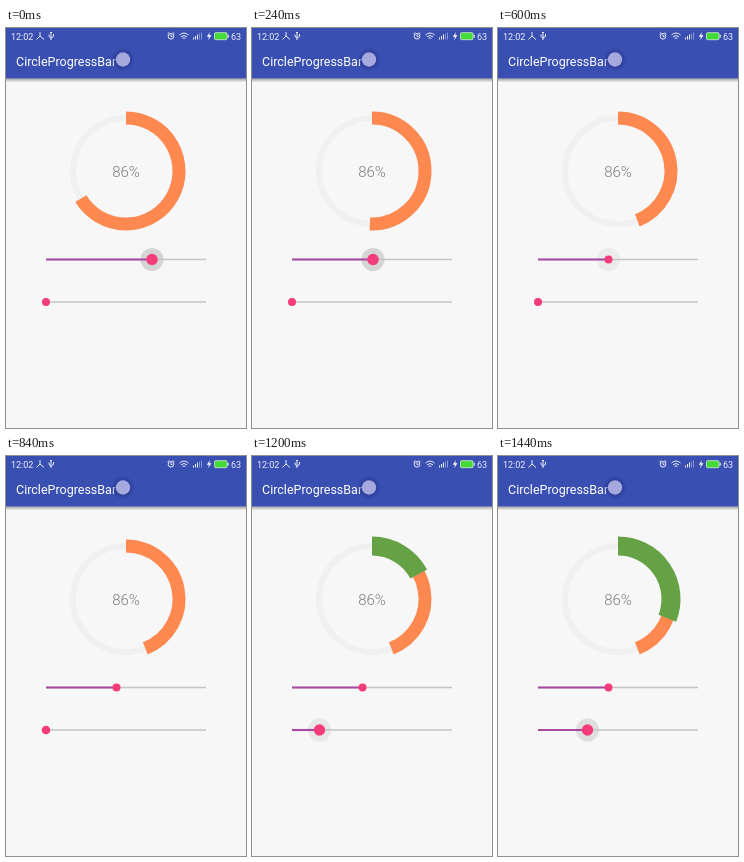
These frames come from a looping animation (240 px wide and 400 px high, 1560 ms). An HTML page:

```html
<!DOCTYPE html>
<html lang="en">
<head>
<meta charset="utf-8">
<title>CircleProgressBar</title>
<style>
html, body { margin: 0; width: 100%; height: 100%; overflow: hidden; background: #f7f7f7; }
svg { display: block; width: 240px; height: 400px; font-family: Roboto, sans-serif; }
.icon { fill: none; stroke: #e9ecfa; stroke-width: 1; }
.ring { fill: none; }
</style>
</head>
<body>
<svg viewBox="0 0 240 400">
  <defs>
    <linearGradient id="shade" x2="0" y2="1">
      <stop stop-color="#000" stop-opacity=".34"/>
      <stop offset="1" stop-color="#000" stop-opacity="0"/>
    </linearGradient>
    <radialGradient id="halo">
      <stop offset=".6" stop-color="#26348c" stop-opacity=".6"/>
      <stop offset="1" stop-color="#26348c" stop-opacity="0"/>
    </radialGradient>
  </defs>
  <rect width="240" height="400" fill="#f7f7f7"/>
  <rect width="240" height="50.5" fill="#3a4fb2"/>
  <rect y="50.5" width="240" height="4" fill="url(#shade)"/>

  <g fill="#eef0fb" font-size="9">
    <text x="5" y="11.5">12:02</text>
    <text x="225" y="11.5">63</text>
  </g>
  <g class="icon">
    <path d="M34 4V8L30.5 11.5M34 8L38 11.5"/>
    <path d="M45 4V12M43 6.5V8.5L45 10L47.5 8.5V6M44 5L45 4L46 5"/>
    <circle cx="165" cy="8.3" r="2.8"/>
    <path d="M165 6.5V8.5H166.5M161.5 6L163.3 4.3M166.7 4.3L168.5 6"/>
    <path d="M173.5 7Q178 3 182.5 7M175 8.8Q178 6.2 181 8.8M176.6 10.4Q178 9.3 179.4 10.4"/>
    <path d="M187.5 11.5V9.5M189.5 11.5V8M191.5 11.5V6.5"/>
    <path d="M193.5 11.5V5.5M195.5 11.5V4.5" opacity=".45"/>
  </g>
  <path d="M204 4L200.8 8.7H203L202 12.3L205.5 7.3H203.2Z" fill="#fff"/>
  <rect x="208.5" y="4.7" width="12.5" height="7" rx="1" fill="#42db35" stroke="#d5ecda" stroke-width=".8"/>
  <rect x="221.5" y="6.7" width="1.3" height="3" fill="#d5ecda"/>

  <text x="10" y="38" font-size="12.5" fill="#fff">CircleProgressBar</text>
  <circle cx="117" cy="31.5" r="12" fill="url(#halo)"/>
  <circle cx="117" cy="31.5" r="7.2" fill="#a6a9de"/>

  <circle class="ring" cx="120" cy="143" r="53" stroke="#f0f0f0" stroke-width="6"/>
  <path class="ring" id="orange" stroke="#fd8850" stroke-width="13"/>
  <path class="ring" id="green" stroke="#65a145" stroke-width="19"/>
  <text x="120" y="149.3" font-size="15" font-weight="300" text-anchor="middle" fill="#7c7c7c">86%</text>

  <g class="slider" transform="translate(40 231.5)"></g>
  <g class="slider" transform="translate(40 274)"></g>
</svg>
<script>
const STEP = 120, LOOP = 1560, WIDTH = 160;
// Per step: thumb offset, thumb radius, ripple strength
const tracks = [
  { x: [106, 91, 81, 74, 71, 70.5], r: [5.7, 5.7, 5.7, 5.7, 5.5, 4], ripple: [1, 1, 1, 1, .9, .35, 0] },
  { x: [0, 0, 0, 0, 0, 0, 0, 0, 4, 15, 27.5, 38, 49.5],
    r: [4, 4, 4, 4, 4, 4, 4, 4.3, 5, 5.6, 5.7],
    ripple: [0, 0, 0, 0, 0, 0, 0, 0, .15, .3, .45, .6, .75] }
];
const arcs = ['orange', 'green'].map(id => document.getElementById(id));
const sliders = [...document.querySelectorAll('.slider')];
const at = (list, i) => list[Math.min(i, list.length - 1)];

function arc(turn) {
  if (!turn) return '';
  const a = turn * 2 * Math.PI;
  return `M120 90A53 53 0 ${+(turn > .5)} 1 ${120 + 53 * Math.sin(a)} ${143 - 53 * Math.cos(a)}`;
}

function draw(step) {
  tracks.forEach((track, i) => {
    const x = at(track.x, step);
    arcs[i].setAttribute('d', arc(x / WIDTH));
    sliders[i].innerHTML = `
      <circle cx="${x}" r="11.5" fill="#d5d5d5" opacity="${at(track.ripple, step)}"/>
      <path d="M0 0H${WIDTH}" stroke="#c3c3c8" stroke-width="1.4"/>
      <path d="M0 0H${x}" stroke="#a8489f" stroke-width="2.1"/>
      <circle cx="${x}" r="${at(track.r, step)}" fill="#f43b7b"/>`;
  });
}

let shown = -1;
function tick() {
  const step = Math.floor(performance.now() % LOOP / STEP);
  if (step !== shown) draw(shown = step);
  requestAnimationFrame(tick);
}
tick();
</script>
</body>
</html>
```
